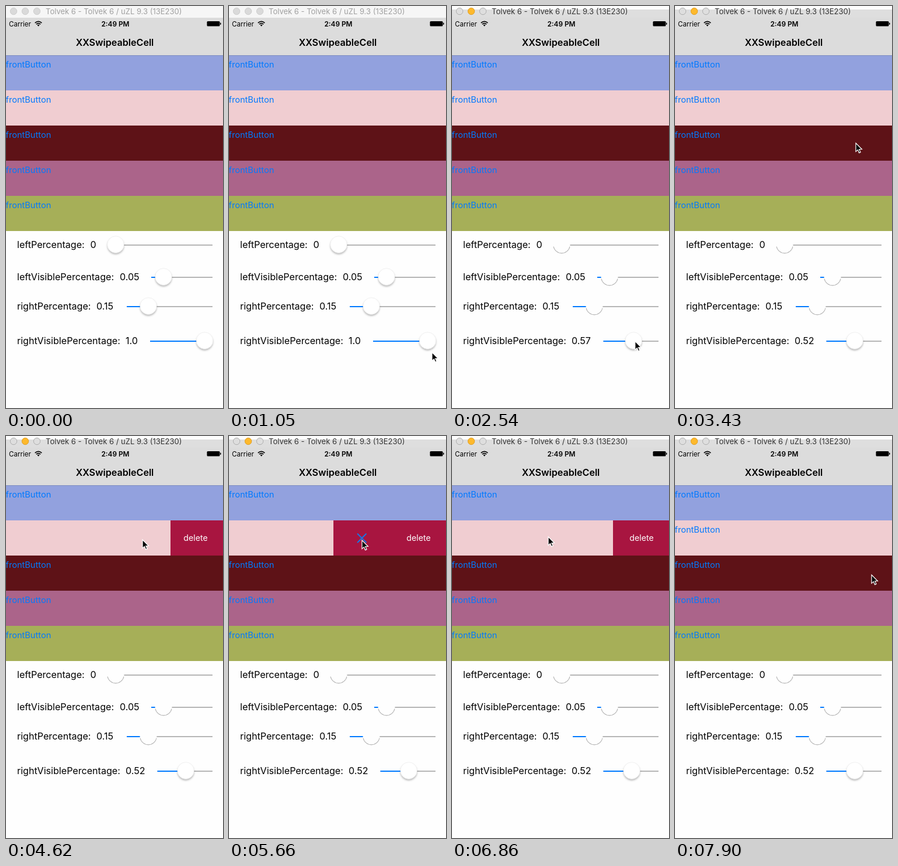
An HTML page for the animation above (8000 ms loop, 372 by 686 pixels).

```html
<!DOCTYPE html>
<html lang="en">
<head>
<meta charset="utf-8">
<style>
html, body { margin: 0; width: 100%; height: 100%; overflow: hidden; background: #fefefe; }
svg { display: block; width: 372px; height: 686px; font: 16.1px Inter, Roboto, sans-serif; }
.blue { fill: #007aff; }
</style>
</head>
<body>
<svg viewBox="0 0 372 686">
  <defs>
    <filter id="shadow" x="-30%" y="-30%" width="160%" height="170%">
      <feDropShadow dx="0" dy="2.3" stdDeviation="1.8" flood-opacity=".28"/>
    </filter>
    <clipPath id="row"><rect y="144" width="372" height="60"/></clipPath>
  </defs>

  <rect id="bar" width="372" height="20"/>
  <rect id="strip" width="372" height="6" fill="#fdfdfd"/>
  <g id="lights">
    <circle cx="13" cy="9" r="5.7"/><circle id="amber" cx="33" cy="9" r="5.7"/><circle cx="53" cy="9" r="5.7"/>
  </g>
  <text id="title" x="68" y="14" font-size="13">Tolvek 6 - Tolvek 6 / uZL 9.3 (13E230)</text>

  <rect y="20" width="372" height="64" fill="#dcdcdc"/>
  <text x="5" y="34.5" font-size="11.6">Carrier</text>
  <g fill="none" stroke="#000" stroke-width="1.6">
    <path d="M49.7 28.9Q55.5 23.8 61.3 28.9M51.8 31.2Q55.5 28 59.2 31.2"/>
    <path d="M55.5 34.8l-2-2.2q2-1.5 4 0z" fill="#000" stroke="none"/>
  </g>
  <text x="187.5" y="34.5" font-size="11.8" font-weight="600" text-anchor="middle">2:49 PM</text>
  <rect x="344.5" y="26" width="22" height="8.5" rx="1.5"/>
  <rect x="367" y="28.5" width="1.5" height="3.5" rx=".7"/>
  <text x="186.5" y="68" font-weight="600" text-anchor="middle">XXSwipeableCell</text>

  <g clip-path="url(#row)" font-size="14.2">
    <rect y="144" width="372" height="60" fill="#a81540"/>
    <path d="M220 166.5l15.5 15.5m0-15.5L220 182" stroke="#1677e6" stroke-width="1.9"/>
    <text x="325" y="179.3" text-anchor="middle" fill="#fff">delete</text>
  </g>
  <g id="rows" font-size="14.6"></g>
  <rect y="84" width="372" height="1" fill="#7d8cc0"/>
  <g id="sliders"></g>
  <path id="cursor" d="M0 0V14.5L3.4 11.4 5.6 16.6 8 15.6 5.8 10.5H10.4Z" stroke="#fff" stroke-width="1.2"/>
</svg>
<script>
const $ = id => document.getElementById(id);
const LOOP = 8000, STEP = 149.1;
const ramp = (n, a, b) => Math.min(1, Math.max(0, (n - a) / (b - a)));

function style(id, fill, stroke = 'none') {
  $(id).setAttribute('fill', fill);
  $(id).setAttribute('stroke', stroke);
}

// Pointer moves: first step, last step, destination
const moves = [
  [0, 7, 348, 591], [7, 9, 337, 573],                      // to the slider
  [11, 18, 310, 572],                                      // drag the knob
  [19, 23, 310, 234], [23, 25, 231, 232], [25, 27, 335, 232],
  [28, 31, 234, 177], [31, 36, 220, 186], [36, 38, 228, 178], // open the row
  [40, 44, 70, 176], [44, 46, 165, 172], [46, 53, 337, 237]   // close it
];

function pointer(n) {
  let x = 259, y = 686;
  for (const [a, b, toX, toY] of moves) {
    const k = ramp(n, a, b);
    x += (toX - x) * k;
    y += (toY - y) * k;
  }
  return `translate(${x} ${y})`;
}

$('rows').innerHTML = ['#92a1de', '#f0cdd1', '#5e1217', '#ab648a', '#a6af58'].map((c, i) =>
  `<g><rect y="${84 + 60 * i}" width="372" height="60" fill="${c}"/>
  <text class="blue" x="-.5" y="${104.5 + 60 * i}">frontButton</text></g>`).join('');
const front = $('rows').children[1];

function slider(name, y, valueX, value, left, thumb, raised) {
  const knob = raised
    ? `<circle cx="${thumb}" cy="${y}" r="14.2" fill="#fff" stroke="#e2e2e2" stroke-width=".5" filter="url(#shadow)"/>`
    : `<circle cx="${thumb}" cy="${y}" r="14.5" fill="#fefefe"/>
       <path d="M${thumb - 14} ${y + 3.5}a14.3 14.3 0 0 0 28 0" fill="none" stroke="#b2b2b2" stroke-width="1.1"/>`;
  return `<text x="19" y="${y + 5.5}">${name}:</text><text x="${valueX}" y="${y + 5.5}">${value}</text>
    <rect x="${left}" y="${y}" width="${354 - left}" height="2" fill="#b6b6b6"/>
    <rect class="blue" x="${left}" y="${y}" width="${thumb - left}" height="2"/>${knob}`;
}

function draw(n) {
  const active = n >= 12;
  const v = active ? .8 - .28 * ramp(n, 12, 18) : 1;
  const left = active ? 259.5 : 247;
  const opened = ramp(n, 29, 33.3) - ramp(n, 44, 48);

  style('bar', active ? '#dedede' : '#f6f6f6');
  style('title', active ? '#333' : '#a0a0a0');
  style('lights', active ? '#dedede' : '#dadada', active ? '#b0b0b0' : '#cdcdcd');
  style('amber', active ? '#fdb92d' : '#dadada', active ? '#e0a028' : '#cdcdcd');
  $('strip').setAttribute('opacity', +active);
  front.setAttribute('transform', `translate(${Math.round(-193 * opened)})`);
  $('cursor').setAttribute('transform', pointer(n));
  $('sliders').innerHTML =
    slider('leftPercentage', 407, 144.5, '0', 174, 188, !active) +
    slider('leftVisiblePercentage', 462, 195, '0.05', 249, 270, !active) +
    slider('rightPercentage', 512, 155, '0.15', 207, 244, !active) +
    slider('rightVisiblePercentage', 571, 205, active ? v.toFixed(2) : '1.0',
      left, left + 13.5 + (327 - left) * v, n !== 12);
}

let last = -1;
function frame() {
  const n = Math.floor((performance.now() % LOOP + 7) / STEP);
  if (n !== last) draw(last = n);
  requestAnimationFrame(frame);
}
frame();
</script>
</body>
</html>
```
